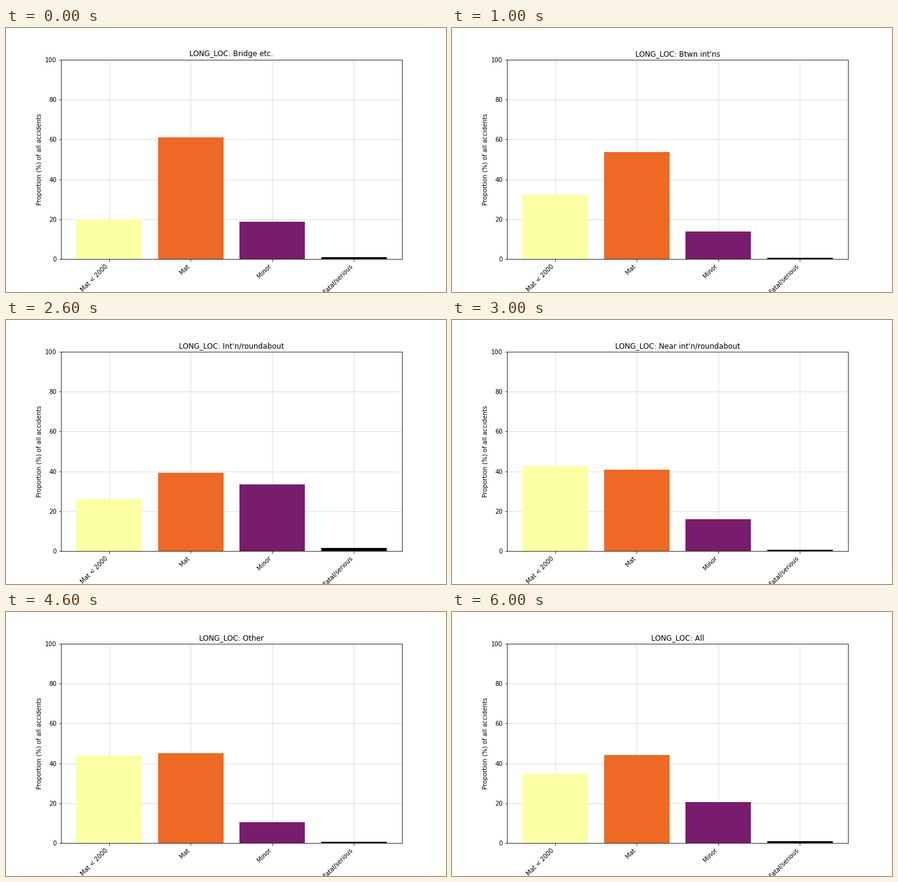
Write a matplotlib script that moves like this. It is 720 px wide and 432 px high and loops after 7000 ms.

```python
import matplotlib.pyplot as plt
import numpy as np
from matplotlib.animation import FuncAnimation

plt.rcParams.update({"font.family": "DejaVu Sans", "font.size": 10})

SEVERITIES = ["Mat < 2000", "Mat", "Minor", "Fatal/serious"]

# Share of accidents (%) by severity for each location
SHARES = {
    "Bridge etc.": (19.8, 61.0, 18.6, 0.9),
    "Btwn int'ns": (32.1, 53.6, 13.7, 0.6),
    "Int'n/roundabout": (26.0, 39.2, 33.3, 1.5),
    "Near int'n/roundabout": (42.6, 40.8, 16.0, 0.6),
    "Other": (43.9, 45.1, 10.4, 0.6),
    "Shop centre": (63.9, 29.2, 6.5, 0.4),
    "All": (34.6, 44.1, 20.5, 0.9),
}
LOCATIONS = list(SHARES)

fig, ax = plt.subplots(figsize=(10, 6), dpi=72)
fig.subplots_adjust(left=0.125, right=0.9, bottom=0.125, top=0.88)

colors = plt.cm.inferno(np.linspace(1, 0, len(SEVERITIES)))
bars = ax.bar(range(len(SEVERITIES)), SHARES[LOCATIONS[0]], color=colors)
ax.set_xticks(range(len(SEVERITIES)), SEVERITIES, rotation=45, ha="right")
ax.set_ylim(0, 100)
ax.set_ylabel("Proportion (%) of all accidents")
ax.set_axisbelow(True)
ax.grid(alpha=0.5)
title = ax.set_title("", fontsize=12)


def update(i):
    location = LOCATIONS[i]
    for bar, share in zip(bars, SHARES[location]):
        bar.set_height(share)
    title.set_text(f"LONG_LOC: {location}")
    return [*bars, title]


anim = FuncAnimation(fig, update, frames=len(LOCATIONS), interval=1000,
                     repeat=True, repeat_delay=0, blit=False)
plt.show()
```
